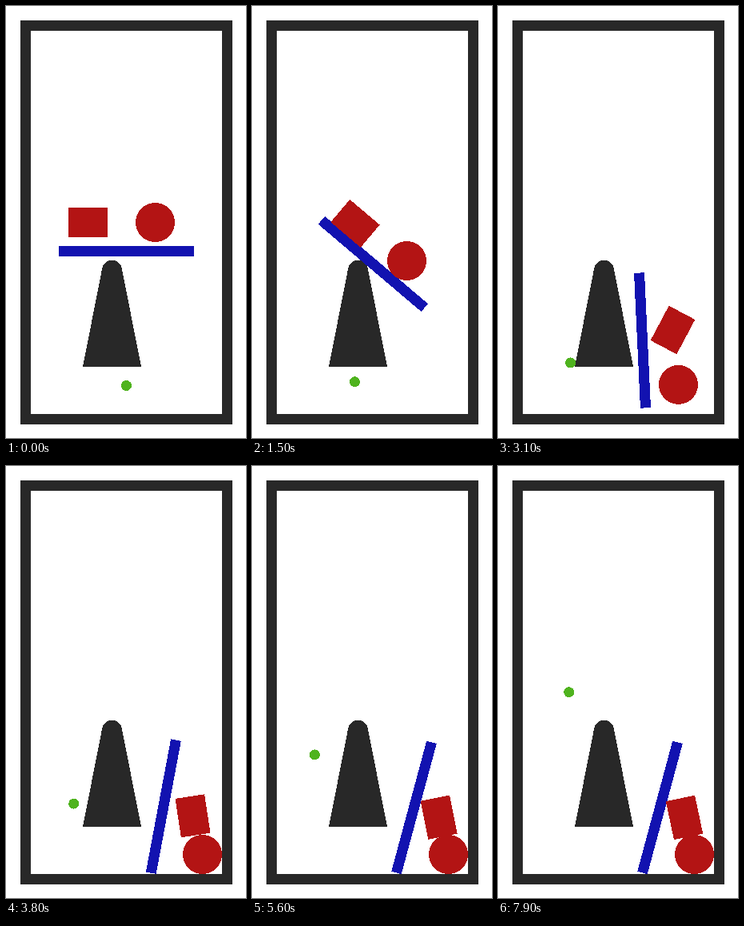
Animation of 300 by 540 pixels, one loop 8000 ms. Source, as an HTML page:

```html
<!DOCTYPE html>
<html lang="en">
<head>
<meta charset="utf-8">
<title>Falling shapes</title>
<style>
  html, body { margin: 0; width: 100%; height: 100%; overflow: hidden; background: #fff; }
  svg { display: block; width: 300px; height: 540px; shape-rendering: crispEdges; }
  .dark { fill: #282828; }
  .red { fill: #b31414; }
  .blue { fill: #1212b0; }
  .green { fill: #4fb31e; }
</style>
</head>
<body>
<svg viewBox="0 0 300 540">
  <path class="dark" fill-rule="evenodd" d="M18 18h265v505h-265zM31 31h239v479h-239z"/>
  <path class="dark" d="M96 451L120.2 328A12.5 12.5 0 0 1 144.8 328L169 451z"/>
  <rect id="plank" class="blue" x="-84.5" y="-6.5" width="169" height="13"/>
  <rect id="box" class="red" x="-24.5" y="-18.5" width="49" height="37"/>
  <circle id="disc" class="red" r="24.5"/>
  <circle id="dot" class="green" r="6.5"/>
</svg>
<script>
const LOOP = 8000, STEP = 100;
const FALL = 24.5;                       // half of gravity, px/s²
const CAP = { x: 132.5, y: 330.5, r: 12.5 };
const FLUSH = 79.4;                      // plank angle along the tower's side
const SLIDE_END = 2.3, LANDED = 3.2;     // seconds

const clamp = u => Math.min(1, Math.max(0, u));
const progress = (t, from, to) => clamp((t - from) / (to - from));
const mix = (a, b, u) => a + (b - a) * u;
const mixPose = (a, b, u) => a.map((v, i) => mix(v, b[i], u));
const easeOut = u => u * (2 - u);
const since = t => Math.max(0, t - 0.1); // the first picture is held

// Point at (along, across) in the axes of a turned body
function offset([x, y, angle], along, across) {
  const a = angle * Math.PI / 180, c = Math.cos(a), s = Math.sin(a);
  return [x + along * c - across * s, y + along * s + across * c, angle];
}

// Drops on the cap, rolls over it, then slips down its side
function tip(t) {
  const angle = Math.min(FLUSH, 40.3 * (Math.max(0, t - 0.6) / 0.9) ** 2);
  const slip = 50 * Math.max(0, t - 1.5) ** 2;
  const lift = Math.max(0, 5.7 - FALL * since(t) ** 2);
  const roll = CAP.r * angle * Math.PI / 180;
  return offset([CAP.x, CAP.y - lift, angle], 18 - roll + slip, -18.3 - slip * 0.08);
}

function slide(t) {
  return mixPose(tip(SLIDE_END), [180.5, 418, 87.3], (t - SLIDE_END) / 0.8);
}

// Foot on the floor, top falling to the right
function lean(t) {
  const u = progress(t, LANDED, 3.9);
  const [x, y, angle] = slide(LANDED);
  const foot = offset([x, y, angle], 84.5, 0);
  return offset([mix(foot[0], 180.5, u), mix(foot[1], 508.5, u), mix(angle, 105.1, u * u)], -84.5, 0);
}

const plank = t => t < SLIDE_END ? tip(t) : t < LANDED ? slide(t) : lean(t);

function ride(t) {
  const bar = tip(t), turn = bar[2] * Math.PI / 180;
  const [x, y, angle] = offset(bar, -48 - 3.6 * turn ** 2, -24.2);
  return [x, Math.min(y, 270.5 + FALL * since(t) ** 2), angle];
}

function box(t) {
  if (t < SLIDE_END) return ride(t);
  const tumbled = [218.5, 405, 118], rest = [234.3, 439, 79.4];
  if (t < 3.1) return mixPose(ride(SLIDE_END), tumbled, progress(t, SLIDE_END, 3.1));
  if (t < 4.7) return mixPose(tumbled, rest, easeOut(progress(t, 3.1, 4)));
  return mixPose(rest, [233, 439.4, 78], progress(t, 4.7, 6.5));
}

// Sinks with the plank, then falls steadily to the floor and rolls to the wall
function disc(t) {
  const s = since(t), d = t - 1.5;
  const drop = d < 0 ? 48 * (s / 1.4) ** 3 : 48 + 103 * d - 3.9 * d * d;
  return [
    Math.min(245.5, 186.5 + 39 * (s / 3) ** 2.25),
    t > 3.5 ? 485.5 : Math.min(485.5, 270.5 + drop)
  ];
}

// Drifts left, then rises evenly along a wide arc
function dot(t) {
  return [
    Math.max(150.5 - 11.8 * since(t) ** 1.86, 78.4 + 1.95 * (t - 5.6) ** 2),
    Math.min(474.5 - 3.2 * t, 391.5 - 34 * (t - 4.7))
  ];
}

const bodies = Object.entries({ plank, box, disc, dot })
  .map(([id, pose]) => [document.getElementById(id), pose]);

function draw(t) {
  for (const [el, pose] of bodies) {
    const [x, y, angle = 0] = pose(t);
    el.setAttribute('transform', `translate(${x} ${y}) rotate(${angle})`);
  }
}

const start = performance.now();
function tick() {
  const t = (performance.now() - start) % LOOP;
  draw(Math.floor(t / STEP) * STEP / 1000);
  requestAnimationFrame(tick);
}
tick();
</script>
</body>
</html>
```
